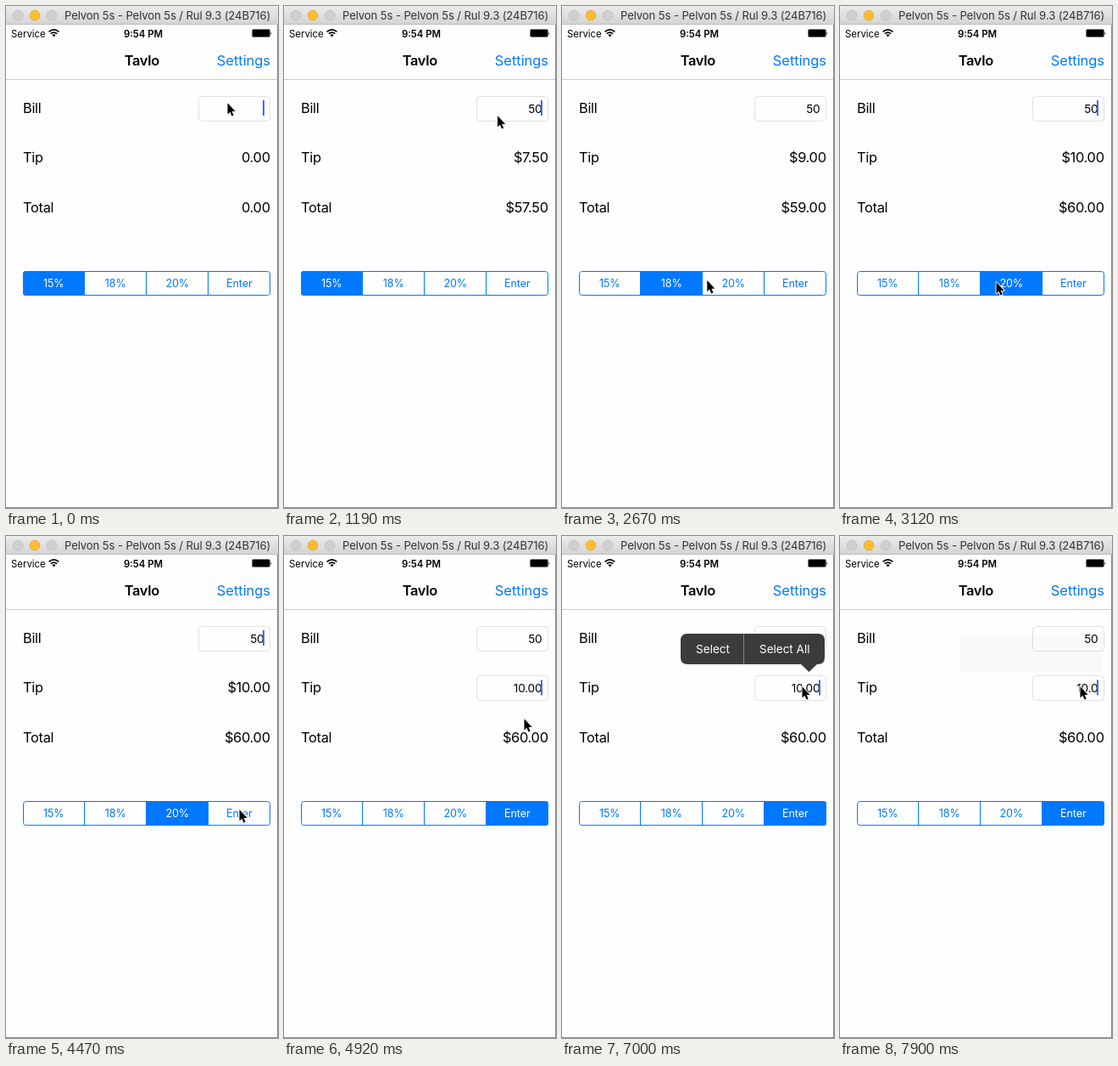
These frames come from a looping animation (321x591 px, 8000 ms). An HTML page:

```html
<!DOCTYPE html>
<html lang="en">
<head>
<meta charset="utf-8">
<title>Tip calculator</title>
<style>
  html, body { margin: 0; width: 100%; height: 100%; overflow: hidden; background: #fff; }
  svg { display: block; font-family: Inter, "Liberation Sans", sans-serif; }
  .body { font-size: 16.4px; letter-spacing: -.3px; }
  .field { font-size: 13.7px; letter-spacing: -.2px; }
  .seg { font-size: 12.6px; letter-spacing: -.1px; text-anchor: middle; }
  .bar { font-size: 11.4px; }
  .menu { font-size: 13.5px; fill: #fff; text-anchor: middle; }
  .end { text-anchor: end; }
  .mid { text-anchor: middle; }
  .box { fill: #fefefe; stroke: #e0e0e0; }
</style>
</head>
<body>
<svg id="stage" width="321" height="591" viewBox="0 0 321 591">
  <defs>
    <linearGradient id="chrome" x2="0" y2="1">
      <stop stop-color="#ebebeb"/><stop offset="1" stop-color="#d3d3d3"/>
    </linearGradient>
    <clipPath id="round"><rect x="20" y="312" width="292" height="29" rx="3.5"/></clipPath>
  </defs>
  <rect width="321" height="591" fill="#fefefe"/>

  <path d="M0 22V4Q0 0 4 0H317Q321 0 321 4V22Z" fill="url(#chrome)"/>
  <path d="M0 21.5H321" stroke="#bdbdbd"/>
  <g stroke-width=".8">
    <circle cx="14" cy="11" r="5.8" fill="#d0d0d0" stroke="#bcbcbc"/>
    <circle cx="34" cy="11" r="5.8" fill="#fdbd2e" stroke="#e2a32a"/>
    <circle cx="54" cy="11" r="5.8" fill="#d0d0d0" stroke="#bcbcbc"/>
  </g>
  <text x="69" y="16" font-size="13.1" letter-spacing="-.1" fill="#333">Pelvon 5s - Pelvon 5s / Rul 9.3 (24B716)</text>

  <text class="bar" x="6" y="36.5">Service</text>
  <g fill="none" stroke="#000" stroke-width="1.7">
    <path d="M50.6 30.4Q56.5 25.4 62.4 30.4M52.8 32.7Q56.5 29.6 60.2 32.7"/>
    <path d="M54.4 34L56.5 36.4L58.6 34Q56.5 32.4 54.4 34Z" fill="#000" stroke="none"/>
  </g>
  <text class="bar mid" x="162" y="36.5" font-weight="600">9:54 PM</text>
  <rect x="290.5" y="27.5" width="21" height="9" rx="1.5" fill="none" stroke="#777"/>
  <rect x="291" y="28" width="20" height="8" rx=".8"/>
  <path d="M312.4 30.3Q314.2 32.2 312.4 34.2Z"/>

  <text class="body mid" x="160.3" y="69.5" font-weight="600">Tavlo</text>
  <text class="body end" x="312" y="69.5" fill="#0078ff" style="letter-spacing:0">Settings</text>
  <path d="M0 86.5H320" stroke="#cbcbcb"/>

  <text class="body" x="20" y="126.4">Bill</text>
  <text class="body" x="20" y="184.4">Tip</text>
  <text class="body" x="20" y="243.4">Total</text>
  <rect class="box" x="227.5" y="106.5" width="84" height="29" rx="4"/>
  <text class="field end" id="bill" x="304.5" y="125.6"></text>
  <text class="body end" id="tip" x="311.7" y="184.4"></text>
  <g id="tipField">
    <rect class="box" x="227.5" y="164.5" width="84" height="29" rx="4"/>
    <text class="field end" id="tipEdit" x="304.5" y="183.6"></text>
  </g>
  <text class="body end" id="total" x="311.7" y="243.4"></text>
  <rect id="caret" x="303" width="2" height="18" fill="#426bf2"/>

  <g id="cells" clip-path="url(#round)"></g>
  <rect x="20.5" y="312.5" width="291" height="28" rx="3" fill="none" stroke="#0078ff"/>
  <path d="M92.5 312V341M165.5 312V341M238.5 312V341" stroke="#0078ff"/>
  <g id="labels"></g>

  <g id="menu">
    <path d="M148 115H302Q310 115 310 123V143Q310 151 302 151H301L291.5 160L282 151H148Q140 151 140 143V123Q140 115 148 115Z" fill="#383838" fill-opacity=".985"/>
    <path d="M214.5 115V151" stroke="#858585"/>
    <text class="menu" x="178" y="138">Select</text>
    <text class="menu" x="262.7" y="138">Select All</text>
  </g>
  <rect id="haze" x="141" y="115" width="169" height="45" fill-opacity=".02"/>

  <path id="pointer" d="M.5 .3V13.4L3.4 10.7L5.5 15.6L7.7 14.7L5.6 9.9H9.7Z" stroke="#fff" stroke-width="1.8" stroke-linejoin="round" paint-order="stroke"/>
  <path d="M320.5 22V591M0 590.5H321" stroke="#8c8c8c"/>
</svg>
<script>
const LOOP = 8000, TICK = 149;
const $ = id => document.getElementById(id);

function add(parent, tag, attrs, text = "") {
  const node = document.createElementNS("http://www.w3.org/2000/svg", tag);
  for (const key in attrs) node.setAttribute(key, attrs[key]);
  node.textContent = text;
  return parent.appendChild(node);
}

const cells = ["15%", "18%", "20%", "Enter"].map((name, i) => ({
  rect: add($("cells"), "rect", { x: 20 + 73 * i, y: 312, width: 73, height: 29, fill: "#0078ff" }),
  label: add($("labels"), "text", { class: "seg", x: 56.3 + 73 * i, y: 331 }, name)
}));

// Taps on the segments: tinted on press, half blended one tick later, then solid.
const taps = [
  { at: -9, cell: 0, rate: .15 },
  { at: 14, cell: 1, rate: .18 },
  { at: 19, cell: 2, rate: .20 },
  { at: 31, cell: 3, rate: .20 }
];

// Pointer stops: tick, x, y
const path = [
  [7, 261, 114], [13, 133, 316.5], [16, 133, 316.5], [19, 184, 325],
  [27, 184, 325], [30, 275, 322], [31, 275, 322],
  [33, 283, 215], [35, 283, 177]
];
const blinks = [1, 10, 17, 24, 31, 35, 42, 48];
const solid = [[4, 10], [32, 35], [44, 48]];

const ease = u => u * u * (3 - 2 * u);
const mix = (a, b, u) => a + (b - a) * u;
const money = v => "$" + v.toFixed(2);
const show = (id, alpha) => $(id).setAttribute("opacity", alpha);

function pointerAt(n) {
  const i = path.findIndex(p => p[0] > n);
  if (i < 0) return path[path.length - 1].slice(1);
  if (i === 0) return path[0].slice(1);
  const a = path[i - 1], b = path[i];
  const u = ease((n - a[0]) / (b[0] - a[0]));
  return [mix(a[1], b[1], u), mix(a[2], b[2], u)];
}

function caretAlpha(n) {
  if (solid.some(([from, to]) => n >= from && n < to)) return 1;
  const last = blinks.filter(b => b <= n).pop() ?? -9;
  return [.5, 0, 0, .5][n - last] ?? 1;
}

function drawCells(n) {
  const done = taps.filter(t => t.at < n);
  const now = done[done.length - 1], before = done[done.length - 2];
  const pressed = taps.find(t => t.at === n);
  const blend = n - now.at === 1 ? .5 : 1;
  cells.forEach(({ rect, label }, i) => {
    const on = i === now.cell ? blend : before && i === before.cell ? 1 - blend : 0;
    const tint = pressed && pressed.cell === i ? .16 : 0;
    rect.setAttribute("fill-opacity", Math.max(on, tint));
    label.setAttribute("fill", `rgb(${mix(0, 255, on)},${mix(120, 255, on)},255)`);
  });
  return now.rate;
}

function draw(t) {
  const n = Math.floor((t + 12) / TICK);
  const rate = drawCells(n);
  const bill = n < 4 ? 0 : n < 5 ? 5 : 50;
  const editing = n >= 32;

  $("bill").textContent = bill || "";
  $("tip").textContent = bill ? money(bill * rate) : "0.00";
  $("total").textContent = bill ? money(bill * (1 + rate)) : "0.00";
  $("tipEdit").textContent = n < 53 ? "10.00" : "10.0";
  show("tip", editing ? 0 : 1);
  show("tipField", editing ? 1 : 0);

  $("caret").setAttribute("y", editing ? 169.5 : 111);
  show("caret", caretAlpha(n));
  show("menu", n < 47 || n > 52 ? 0 : n === 52 ? .5 : 1);
  show("haze", n > 52 ? 1 : 0);

  const [x, y] = pointerAt(n);
  $("pointer").setAttribute("transform", `translate(${x} ${y})`);
}

function frame() {
  draw(performance.now() % LOOP);
  requestAnimationFrame(frame);
}
frame();
</script>
</body>
</html>
```
